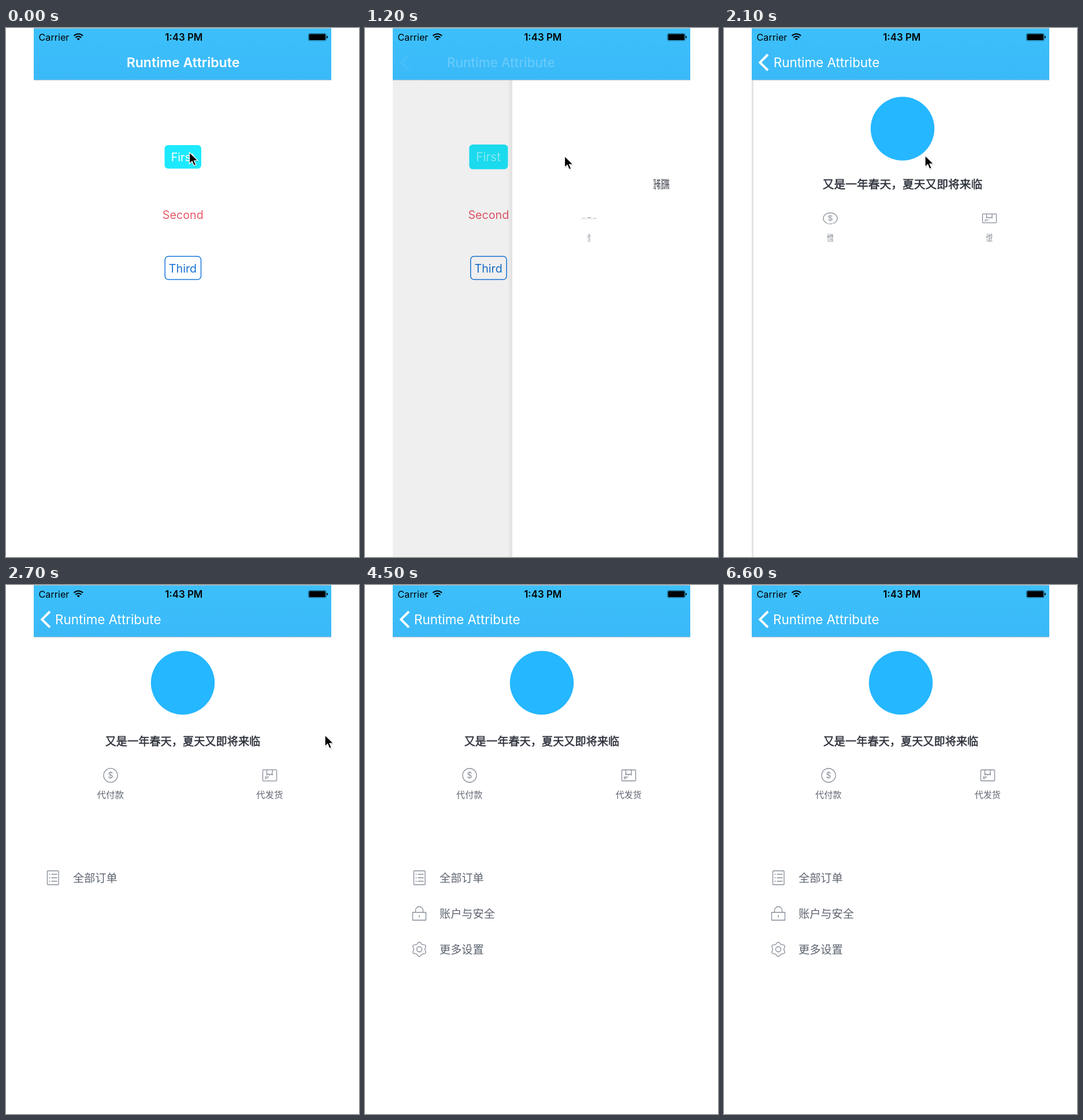
Recreate the animation shown at these times as an HTML page. Size 611x917 px, loop 6.9 s.

```html
<!DOCTYPE html>
<html lang="zh-CN">
<head>
<meta charset="utf-8">
<title>Runtime Attribute</title>
<style>
  html, body { margin: 0; width: 100%; height: 100%; overflow: hidden; background: #fff; }
  svg { display: block; width: 611px; height: 917px; font-family: Inter, Roboto, sans-serif; }
  .zh { font-family: "Noto Sans CJK SC", "Noto Sans CJK", sans-serif; fill: #5d6470; }
  .zh.strong { fill: #2c303a; stroke: #2c303a; stroke-width: .5; }
  .mid { text-anchor: middle; }
  .icon { fill: none; stroke: #858b97; stroke-width: 1.3; stroke-linejoin: round; }
</style>
</head>
<body>
<svg viewBox="0 0 611 917">
  <defs>
    <clipPath id="screen"><rect x="48" y="0" width="515" height="917"/></clipPath>
    <linearGradient id="shade">
      <stop offset="0" stop-opacity="0"/><stop offset="1" stop-opacity=".1"/>
    </linearGradient>
    <linearGradient id="bar" x2="0" y2="1">
      <stop offset="0" stop-color="#3cc0fb"/><stop offset="1" stop-color="#3bb9f8"/>
    </linearGradient>
  </defs>

  <g clip-path="url(#screen)">
    <g id="home" font-size="19.7" class="mid">
      <g id="first">
        <rect x="274.5" y="203" width="63.5" height="40.7" rx="6" fill="#1de9fe"/>
        <text id="firstText" x="306" y="231" fill="#fff">First</text>
      </g>
      <text x="306.3" y="331.3" fill="#e8596a">Second</text>
      <rect x="275.2" y="395.7" width="62.3" height="40.3" rx="6" fill="none" stroke="#1a78dc" stroke-width="1.5"/>
      <text x="306" y="423.5" fill="#1a72d4">Third</text>
    </g>
    <rect id="dim" x="48" y="90" width="515" height="827"/>

    <g id="page">
      <rect id="edge" x="39" y="90" width="9" height="827" fill="url(#shade)"/>
      <rect x="48" y="90" width="515" height="827" fill="#fff"/>
      <circle id="avatar" cx="306" cy="169.5" r="55.2" fill="#25b7ff"/>
      <text id="headline" class="zh mid strong" x="306" y="278" font-size="19.2">又是一年春天，夏天又即将来临</text>

      <g id="icons" class="icon">
        <circle cx="181" cy="330" r="12"/>
        <text class="mid" x="181" y="335" font-size="14" fill="#858b97" stroke="none">$</text>
        <rect x="444.5" y="320.5" width="24" height="19" rx="1"/>
        <path d="M451.5 320.5v9l2.5-2 2.3 2 2.3-2 2.4 2v-9M448 333h7M448 335.5h4"/>
      </g>
      <text id="pay" class="zh mid" x="180.7" y="369" font-size="15.1">代付款</text>
      <text id="ship" class="zh mid" x="456.3" y="369" font-size="15.1">代发货</text>

      <g class="icon">
        <g id="icon0">
          <rect x="84.5" y="495.5" width="19.5" height="24" rx="1"/>
          <path d="M91.5 501.5h10M91.5 507.5h10M91.5 513.5h10M87.5 501.5h2M87.5 507.5h2M87.5 513.5h2"/>
        </g>
        <g id="icon1">
          <rect x="82.5" y="567.5" width="23" height="13.5"/>
          <path d="M87.5 567.5v-3.5a6.5 6.5 0 0 1 13 0v3.5M94 572v4.5"/>
        </g>
        <g id="icon2">
          <path id="gear"/>
          <circle cx="94" cy="631.5" r="4.5"/>
        </g>
      </g>
      <g font-size="19.2">
        <text id="row0" class="zh" x="129" y="515">全部订单</text>
        <text id="row1" class="zh" x="129" y="577">账户与安全</text>
        <text id="row2" class="zh" x="129" y="639">更多设置</text>
      </g>
    </g>
  </g>

  <rect x="48" y="0" width="515" height="90" fill="url(#bar)"/>
  <path d="M48 .5h515M48 90.3h515" stroke="#b9c0c4" stroke-width=".9"/>
  <text x="56.5" y="21.5" font-size="16.2">Carrier</text>
  <text class="mid" x="307.8" y="21.7" font-size="16.9" font-weight="600">1:43 PM</text>
  <g fill="none" stroke="#000" stroke-width="2">
    <path d="M117.5 13.5a11 11 0 0 1 15.6 0M120.3 16.7a7 7 0 0 1 10 0"/>
    <path d="M122.7 18.7a3.7 3.7 0 0 1 5.2 0l-2.6 2.8z" fill="#000" stroke="none"/>
  </g>
  <rect x="523.3" y="9.5" width="31" height="12.6" rx="2.5" fill="none" stroke="#000" stroke-width=".7" opacity=".6"/>
  <rect x="524.5" y="10.6" width="28.6" height="10.4" rx="1.5"/>
  <path d="M555 13.5q2 .5 2 2.3t-2 2.3z"/>
  <g fill="#fff">
    <text id="title" class="mid" x="306.5" y="68" font-size="23.1" font-weight="600">Runtime Attribute</text>
    <text id="back" x="85" y="68" font-size="22.4">Runtime Attribute</text>
  </g>
  <path id="chevron" d="M76 46 62.3 59.7 76 73.4" fill="none" stroke="#fff" stroke-width="4"/>

  <g id="cursor">
    <g transform="scale(1.08)">
      <path d="M1 2v18l4.2-4 3 7 3-1.3-3-6.7 5.8-.3z" opacity=".2"/>
      <path d="M0 0v18.5l4.3-4 3 7 3.2-1.3-3-6.8 5.8-.4z" stroke="#fff" stroke-width="1.2"/>
    </g>
  </g>
</svg>

<script>
const STEP = 300, LOOP = 6900, WIDTH = 515;
const el = id => document.getElementById(id);
const set = (id, name, value) => el(id).setAttribute(name, value);
const shift = (id, x, y = 0) => set(id, "transform", `translate(${x} ${y})`);
const scale = (id, cx, cy, sx, sy) =>
  set(id, "transform", `translate(${cx} ${cy}) scale(${sx} ${sy}) translate(${-cx} ${-cy})`);

// Value of a stepped curve that begins at tick `start` and holds at both ends.
const curve = (values, tick, start) =>
  values[Math.max(0, Math.min(values.length - 1, tick - start))];

const PUSH = [WIDTH, 207, 62, 14, 3, 0];
const DROP = [1, .28, -.033, -.01, 0];
const UNFOLD = [1, .22, -.03, -.01, 0];
const UNFOLD_LATE = [1, .85, .2, -.03, 0];
const SLIDE = [-700, -70, -13, 4, 2, 0];
const slides = { icon0: 7, row0: 7, icon1: 8, row1: 9, icon2: 9, row2: 9 };

function gearPath() {
  const points = [];
  for (let i = 0; i < 72; i++) {
    const a = i * Math.PI / 36, r = 11 + 1.4 * Math.cos(6 * a);
    points.push((94 + r * Math.sin(a)).toFixed(2) + " " + (631.5 - r * Math.cos(a)).toFixed(2));
  }
  return "M" + points.join("L") + "Z";
}

function cursorAt(tick) {
  if (tick < 4) return [317.5, 215.5];
  if (tick < 7) return [345.5, 222];
  if (tick < 9) return [348, 221];
  return tick === 9 ? [552, 260] : [-50, -50];
}

function draw(tick) {
  const offset = curve(PUSH, tick, 3), progress = 1 - offset / WIDTH;
  const press = tick >= 3 ? 1.055 : 1;

  shift("home", -.3 * (WIDTH - offset));
  scale("first", 306, 223.4, press, press);
  set("firstText", "opacity", press > 1 ? .5 : 1);
  set("dim", "opacity", .105 * progress);
  shift("page", offset);
  set("page", "visibility", progress ? "visible" : "hidden");
  set("edge", "opacity", 1 - progress * progress);

  set("title", "opacity", tick < 4 ? 1 : 0);
  set("back", "opacity", curve([0, .22, .3, .7, 1], tick, 3));
  set("back", "font-weight", tick === 4 ? 500 : 400);
  shift("back", .275 * offset);
  set("chevron", "opacity", curve([0, .06, .4, .8, 1], tick, 3));

  const drop = curve(DROP, tick, 5);
  shift("avatar", 0, -150 * drop);
  scale("headline", 306, 271, 1 - .9 * drop, 1);
  scale("icons", 306, 330, 1, 1 - .9 * curve(UNFOLD, tick, 6));
  const label = 1 - .9 * curve(UNFOLD_LATE, tick, 6);
  scale("pay", 180.7, 363, label, 1);
  scale("ship", 456.3, 363, label, 1);

  for (const id in slides) shift(id, curve(SLIDE, tick, slides[id]));
  shift("cursor", ...cursorAt(tick));
}

function frame() {
  draw(Math.floor(performance.now() % LOOP / STEP));
  requestAnimationFrame(frame);
}

set("gear", "d", gearPath());
frame();
</script>
</body>
</html>
```
